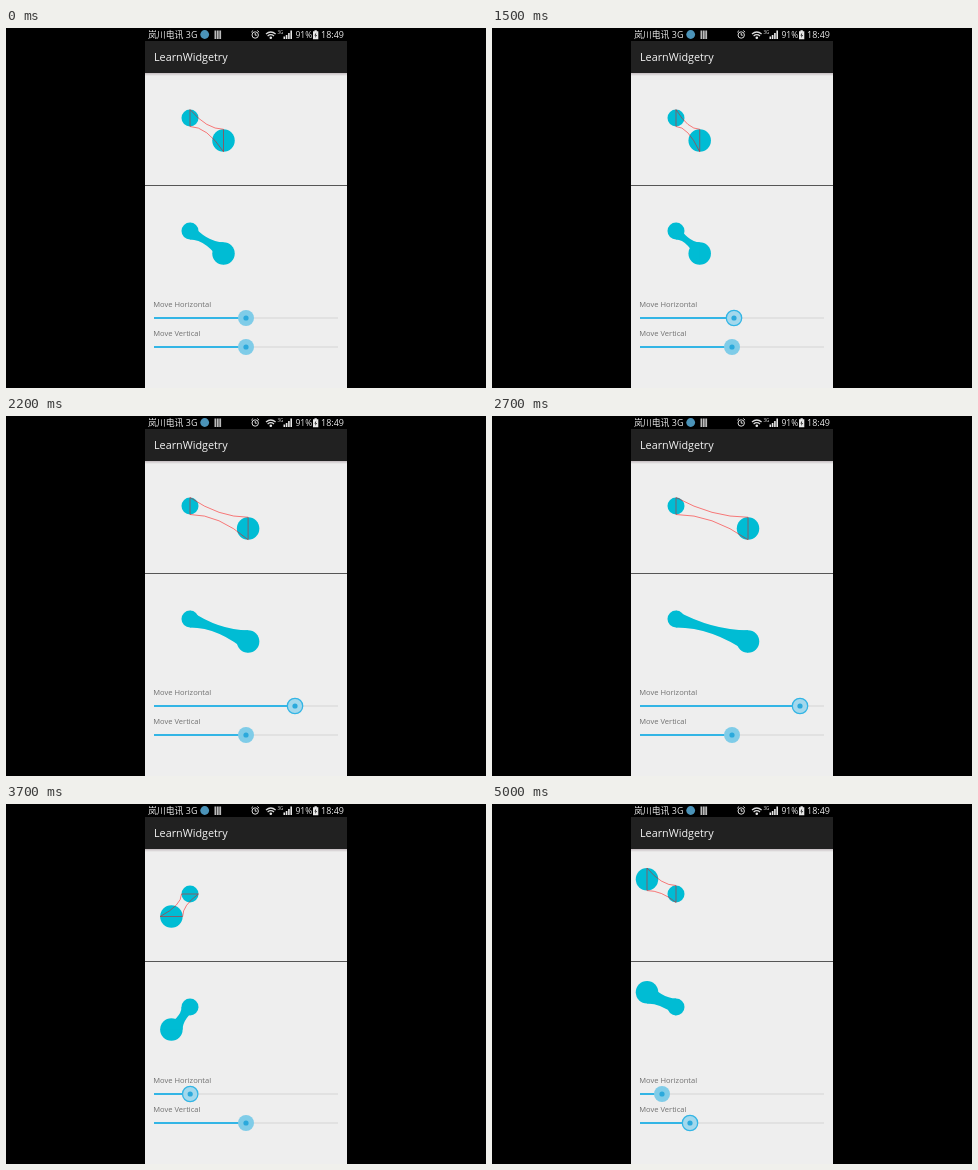
Recreate the animation shown at these times as an HTML page. Size 480x360 px, loop 5100 ms.

```html
<!DOCTYPE html>
<html lang="en">
<head>
<meta charset="utf-8">
<title>Elastic dots</title>
<style>
  html, body { margin: 0; width: 100%; height: 100%; overflow: hidden; background: #000; }
  svg { display: block; width: 100vw; height: 100vh; }
  text { font-family: "Open Sans", "Noto Sans", "Noto Sans CJK SC", "Noto Sans CJK", sans-serif; }
</style>
</head>
<body>
<svg viewBox="0 0 480 360" xmlns="http://www.w3.org/2000/svg">
  <defs>
    <linearGradient id="shade" x2="0" y2="1">
      <stop offset="0" stop-color="#c4bcc0"/>
      <stop offset="1" stop-color="#eee"/>
    </linearGradient>
  </defs>
  <rect width="480" height="360"/>
  <rect x="139" y="13" width="202" height="347" fill="#eee"/>
  <rect x="139" y="13" width="202" height="32" fill="#212121"/>
  <rect x="139" y="45" width="202" height="3" fill="url(#shade)"/>

  <g fill="#e8e8e8" font-size="8.9">
    <text x="142" y="10">岚川电讯 3G</text>
    <circle cx="198.7" cy="6.5" r="4.4" fill="#4b93b8"/>
    <path d="M208.5 2.5h1.8v8.5h-1.8zM210.9 2.5h1.8v8.5h-1.8zM213.3 2.5h1.8v8.5h-1.8z" fill="#bbb"/>
    <g fill="none" stroke="#ddd" stroke-width="1">
      <circle cx="249.2" cy="7" r="3.2"/>
      <path d="M249.2 5v2.2h1.6M245.3 4.2l1.8-1.7M253.1 4.2l-1.8-1.7"/>
      <path d="M260 6q4.800-4 9.600 0M261.600 8q3.200-2.600 6.400 0" stroke-width="1.3"/>
    </g>
    <circle cx="264.8" cy="9.8" r="1.3"/>
    <text x="271.5" y="5.700" font-size="4.500">3G</text>
    <path d="M277.500 8.500h1.600v2.500h-1.600zM279.800 7h1.600v4h-1.600zM282.100 5h1.600v6h-1.600zM284.400 2.500h1.600v8.500h-1.600z"/>
    <text x="289.500" y="10" font-size="8.500">91%</text>
    <path d="M307 3.300h1.500v-1.100h2.300v1.100h1.500v8h-5.300z"/>
    <path d="M310.300 4.500l-2 3h1.300l-.6 2.600 2.100-3.200h-1.300z" fill="#222"/>
    <text x="315" y="10" font-size="9">18:49</text>
  </g>

  <text x="148" y="33.300" font-size="10.800" fill="#f4f4f4">LearnWidgetry</text>
  <rect x="139" y="157" width="202" height="1" fill="#555"/>
  <g font-size="7.550" fill="#707070">
    <text x="147.300" y="278.800">Move Horizontal</text>
    <text x="147.300" y="307.500">Move Vertical</text>
  </g>

  <g fill="#00bcd4">
    <circle cx="184" cy="90" r="8.500"/>
    <circle id="dotA" r="11.250"/>
    <path id="outline" fill="none" stroke="#f00" stroke-width=".5"/>
    <g transform="translate(0 113)">
      <circle cx="184" cy="90" r="8.500"/>
      <circle id="dotB" r="11.250"/>
      <path id="blob"/>
    </g>
  </g>
  <g id="sliders"></g>
</svg>
<script>
const LOOP = 5100, STEP = 100;
const LEFT = 148, RIGHT = 332;
const small = { x: 184, y: 90, r: 8.5 };
const bigR = 11.25;
const $ = id => document.getElementById(id);

function make(name, attrs, parent) {
  const el = document.createElementNS('http://www.w3.org/2000/svg', name);
  set(el, attrs);
  return parent.appendChild(el);
}

function set(el, attrs) {
  for (const key in attrs) el.setAttribute(key, attrs[key]);
}

function makeSlider(y) {
  const box = $('sliders');
  make('rect', { x: LEFT, y: y - 0.5, width: RIGHT - LEFT, height: 1, fill: '#d6d6d6' }, box);
  const bar = make('rect', { x: LEFT, y: y - 1, height: 2, fill: '#33b5e5' }, box);
  const halo = make('circle', { cy: y, stroke: '#33b5e5' }, box);
  const core = make('circle', { cy: y, r: 2.6, fill: '#2ba9dc' }, box);
  return (x, pressed) => {
    set(bar, { width: x - LEFT });
    set(halo, {
      cx: x,
      r: pressed ? 7.7 : 8,
      fill: pressed ? '#a3d8ec' : '#7fcce8',
      'stroke-width': pressed ? 1.3 : 0
    });
    set(core, { cx: x });
  };
}

// Linear interpolation through [time, value] pairs
function track(keys, t) {
  let i = 0;
  while (i < keys.length - 2 && t > keys[i + 1][0]) i++;
  const [t0, a] = keys[i], [t1, b] = keys[i + 1];
  const p = Math.min(1, Math.max(0, (t - t0) / (t1 - t0)));
  return a + (b - a) * p;
}

const dragH = [[1500, 242], [1900, 269], [2500, 309], [2600, 309], [2700, 308],
               [3300, 231], [3800, 172.5], [3900, 170]];
const dragV = [[4400, 244], [5000, 198]];

// Neck joining the dots, attached across the dominant axis
function neck(x, y) {
  const { x: sx, y: sy, r } = small;
  if (Math.abs(x - sx) > Math.abs(y - sy)) {
    const mid = (sx + x) / 2;
    const top = Math.max(sy - r, y - bigR), low = Math.min(sy + r, y + bigR);
    return `M${sx} ${sy - r}Q${mid} ${top} ${x} ${y - bigR}V${y + bigR}` +
           `Q${mid} ${low} ${sx} ${sy + r}Z`;
  }
  const mid = (sy + y) / 2;
  const west = Math.max(sx - r, x - bigR), east = Math.min(sx + r, x + bigR);
  return `M${sx - r} ${sy}Q${west} ${mid} ${x - bigR} ${y}H${x + bigR}` +
         `Q${east} ${mid} ${sx + r} ${sy}Z`;
}

const sliderH = makeSlider(290), sliderV = makeSlider(319);

function draw(time) {
  const t = Math.floor((time % LOOP) / STEP) * STEP;
  const movedH = t >= 1500, movedV = t >= 4400;
  const h = movedH ? track(dragH, t) : 240;
  const v = movedV ? track(dragV, t) : 240;
  // The dot starts off its slider value until the first touch
  const x = movedH ? 155 + (h - 170) * 0.732 : 217.5;
  const y = movedV ? 75.3 + (v - 198) * 0.61 : 112.5;

  sliderH(h, movedH && t < 4000);
  sliderV(v, movedV);
  for (const id of ['dotA', 'dotB']) set($(id), { cx: x, cy: y });
  const d = neck(x, y);
  for (const id of ['outline', 'blob']) set($(id), { d });
}

const start = performance.now();
function tick() {
  draw(performance.now() - start);
  requestAnimationFrame(tick);
}
tick();
</script>
</body>
</html>
```
